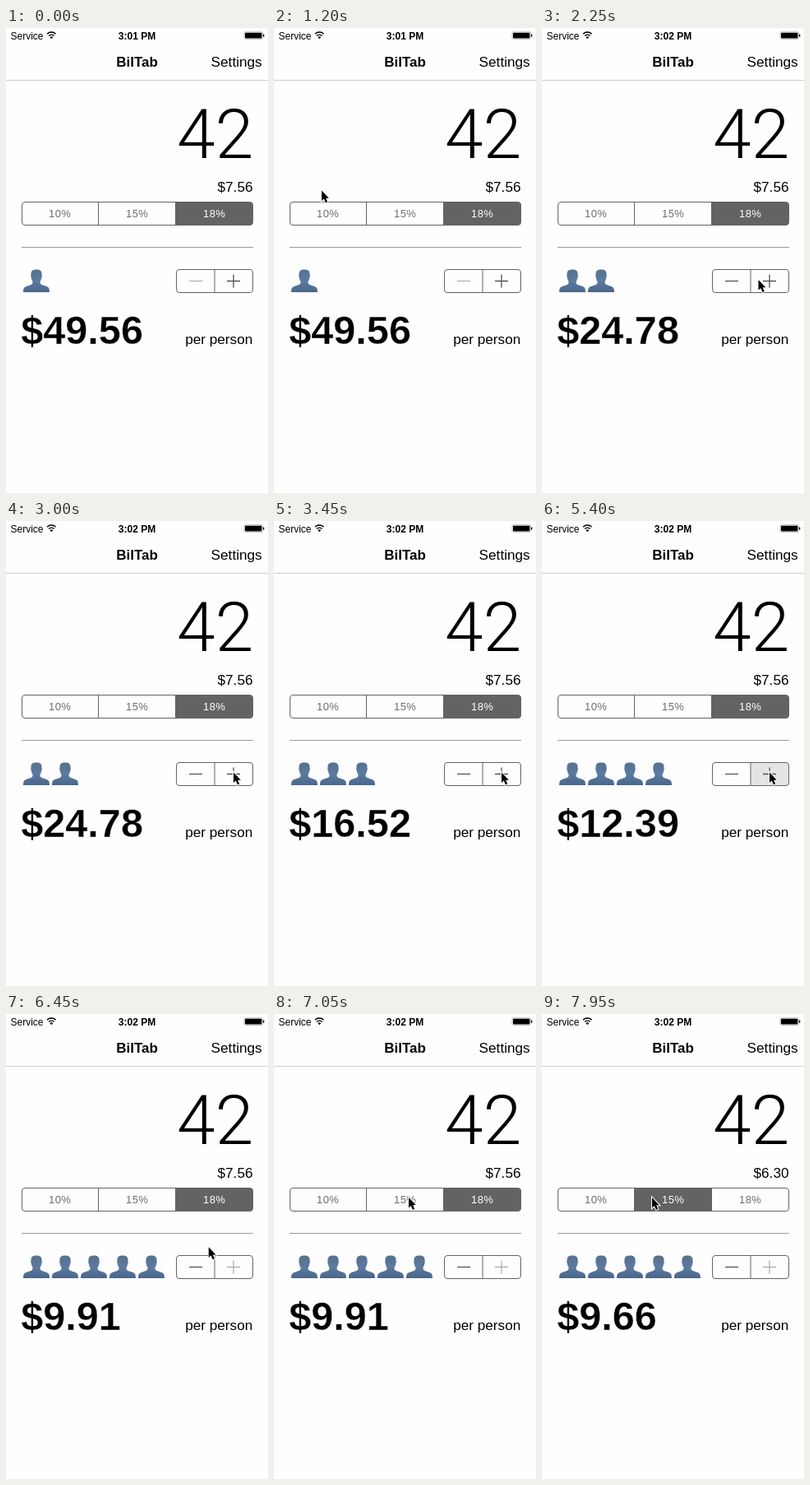
Write an HTML page that moves like this. It is 319 px wide and 565 px high and loops after 8000 ms.

```html
<!DOCTYPE html>
<html lang="en">
<head>
<meta charset="utf-8">
<title>Tip calculator</title>
<style>
  html, body { margin: 0; width: 100%; height: 100%; overflow: hidden; background: #fefefe; }
  svg { display: block; width: 100%; height: 100%; }
  text { font: 17.2px "Liberation Sans", Arial, sans-serif; }
  .status { font-size: 12px; }
  .title { font-size: 17px; }
  .bold { font-weight: 700; }
  .end { text-anchor: end; }
  .mid { text-anchor: middle; }
  .bill { font: 300 84px Roboto, sans-serif; }
  .share { font-size: 48.6px; font-weight: 700; stroke: #fefefe; stroke-width: .4px; }
  .segment text { font-size: 13px; letter-spacing: .4px; fill: #6b6b6b; }
  .segment rect { fill: none; }
  .segment.on text { fill: #fff; }
  .segment.on rect { fill: #636363; }
  .frame { fill: none; stroke: #636363; }
  .sign { fill: none; stroke: #555; stroke-width: 1.3px; }
  .sign.off { stroke: #b0b0b0; }
</style>
</head>
<body>
<svg viewBox="0 0 319 565">
  <defs>
    <linearGradient id="blue" x2="0" y2="1">
      <stop stop-color="#566f8c"/>
      <stop offset=".5" stop-color="#5c7ba0"/>
      <stop offset="1" stop-color="#4a668b"/>
    </linearGradient>
    <path id="bust" fill="url(#blue)" d="M-16 27.5C-16 23-15.2 21.4-12.5 20.4L-6 18.2Q-4.4 17.4-4.4 15Q-6 12.5-6.2 10Q-7.4 8-6.5 6.5C-7 1.5-4.5 0 0 0S7 1.5 6.5 6.5Q7.4 8 6.2 10Q6 12.5 4.4 15Q4.4 17.4 6 18.2L12.5 20.4C15.2 21.4 16 23 16 27.5Z"/>
    <clipPath id="bar"><rect x="19.5" y="211.5" width="281" height="28" rx="3.5"/></clipPath>
    <clipPath id="stepper"><rect x="207.5" y="293.5" width="93" height="28" rx="3.5"/></clipPath>
  </defs>

  <!-- Status bar -->
  <text class="status" x="5.5" y="13.5">Service</text>
  <path d="M50 7.2A7.6 7.6 0 0 1 60.6 7.2M52 9.5A4.7 4.7 0 0 1 58.6 9.5" fill="none" stroke="#000" stroke-width="1.5"/>
  <path d="M55.3 13.2L53.4 11.2A2.8 2.8 0 0 1 57.2 11.2Z"/>
  <text class="status bold mid" id="clock" x="159.5" y="13.5"></text>
  <rect x="290" y="4.8" width="22.4" height="8.6" rx="1.5" fill="none" stroke="#888" stroke-width=".6"/>
  <rect x="291" y="5.8" width="20.4" height="6.6" rx=".8"/>
  <rect x="313" y="7.6" width="1.3" height="3"/>

  <!-- Navigation bar -->
  <text class="title bold mid" x="159.5" y="47">BilTab</text>
  <text class="end" x="311.7" y="47">Settings</text>
  <path d="M0 63.5H319" stroke="#cdcdcd"/>

  <!-- Bill and tip -->
  <text class="bill end" x="301.3" y="157.7">42</text>
  <text class="end" id="tip" x="300.5" y="198.6"></text>
  <g id="segments" clip-path="url(#bar)"></g>
  <rect class="frame" x="19.5" y="211.5" width="281" height="28" rx="3.5"/>
  <path class="frame" d="M112.5 211.5V239.5M206.5 211.5V239.5"/>
  <path d="M19 266.5H301" stroke="#9c9c9c"/>

  <!-- People and share -->
  <g id="people"></g>
  <rect id="press" x="254" y="293" width="47" height="29" fill="#e4e4e4" clip-path="url(#stepper)"/>
  <rect class="frame" x="207.5" y="293.5" width="93" height="28" rx="3.5"/>
  <path class="frame" d="M254 293.5V321.5"/>
  <path class="sign" id="minus" d="M223 307.5H239"/>
  <path class="sign" id="plus" d="M269 307.5H285M277 299.5V315.5"/>
  <text class="share" id="share" x="18.3" y="384"></text>
  <text class="end" x="300.3" y="383.7">per person</text>

  <path id="cursor" d="M0 0V12.6L2.8 10L5 15L7.2 14L5.2 9.2H8.8Z" stroke="#fff" stroke-width="2" paint-order="stroke"/>
</svg>

<script>
const LOOP = 8000, TICK = 150, BILL = 42, MAX_PEOPLE = 5;
const CLOCK_CHANGE = 1500, TIP_CHANGE = 7200;
const ADD_TIMES = [2250, 3450, 4500, 5550];
const RATES = [10, 15, 18];

// The cursor appears at START and glides from one stop to the next
const START = { x: 286, y: 452 };
const MOVES = [
  { from: 300, to: 450, x: 271, y: 439.5 },
  { from: 750, to: 1200, x: 58, y: 197.5 },
  { from: 1200, to: 1800, x: 263.5, y: 306 },
  { from: 2550, to: 3000, x: 277, y: 305.5 },
  { from: 6300, to: 7200, x: 160, y: 220 },
  { from: 7650, to: 7950, x: 134, y: 223 }
];

const $ = id => document.getElementById(id);
const money = value => "$" + value.toFixed(2);
const show = (node, visible) => node.setAttribute("visibility", visible ? "visible" : "hidden");
const easeOut = k => Math.sin(Math.PI / 2 * Math.min(1, Math.max(0, k)));

$("segments").innerHTML = RATES.map((rate, i) => {
  const x = 19 + 94 * i;
  return `<g class="segment"><rect x="${x}" y="211" width="94" height="29"/>
    <text class="mid" x="${x + 46.7}" y="230">${rate}%</text></g>`;
}).join("");
$("people").innerHTML = Array.from({ length: MAX_PEOPLE }, (_, i) =>
  `<use href="#bust" x="${37 + 35 * i}" y="293.5"/>`).join("");

function cursorAt(t) {
  return MOVES.reduce((spot, move) => {
    const k = easeOut((t - move.from) / (move.to - move.from));
    return { x: spot.x + (move.x - spot.x) * k, y: spot.y + (move.y - spot.y) * k };
  }, START);
}

function draw(t) {
  const people = 1 + ADD_TIMES.filter(at => at <= t).length;
  const rate = t < TIP_CHANGE ? 18 : 15;
  const tip = BILL * rate / 100;

  $("clock").textContent = t < CLOCK_CHANGE ? "3:01 PM" : "3:02 PM";
  $("tip").textContent = money(tip);
  $("share").textContent = money((BILL + tip) / people);
  [...$("segments").children].forEach((node, i) => node.classList.toggle("on", RATES[i] === rate));
  [...$("people").children].forEach((node, i) => show(node, i < people));
  $("minus").classList.toggle("off", people === 1);
  $("plus").classList.toggle("off", people === MAX_PEOPLE);

  // The first tap is too brief to highlight the button
  show($("press"), people > 1 && ADD_TIMES.includes(t + TICK));

  const { x, y } = cursorAt(t);
  show($("cursor"), t >= MOVES[0].from);
  $("cursor").setAttribute("transform", `translate(${x} ${y})`);
}

// The screen refreshes in coarse ticks
function frame() {
  const t = performance.now() % LOOP;
  draw(t - t % TICK);
  requestAnimationFrame(frame);
}
frame();
</script>
</body>
</html>
```
